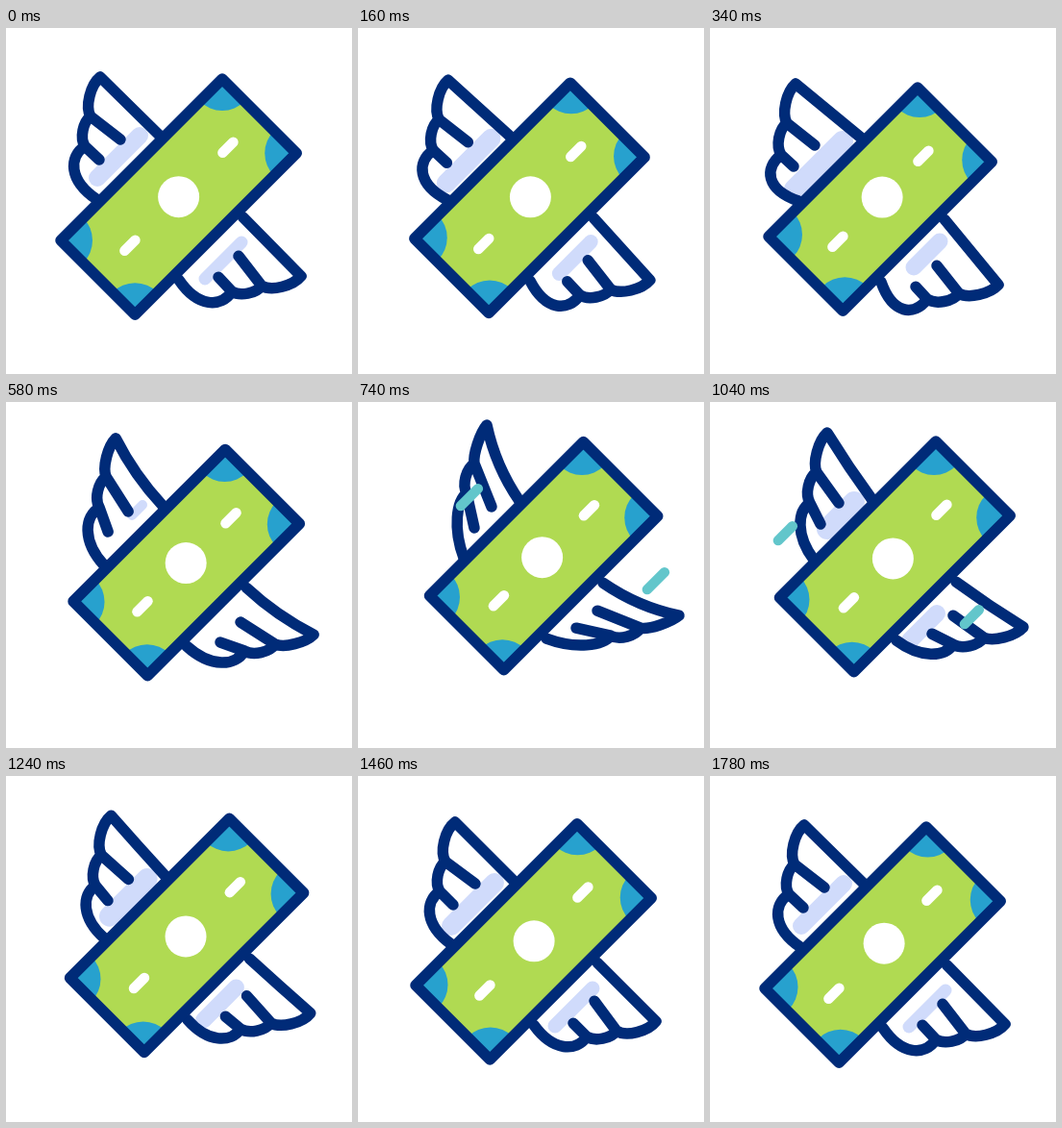
These frames come from a looping animation (360x360 px, 1800 ms). An HTML page:

```html
<!DOCTYPE html>
<html lang="en">
<head>
<meta charset="utf-8">
<title>Flying banknote</title>
<style>
  html, body { margin: 0; width: 100%; height: 100%; overflow: hidden; background: #fff; }
  svg { display: block; width: 100vw; height: 100vh; }
  .line { fill: none; stroke: #002b78; stroke-width: 11.5; stroke-linecap: round; stroke-linejoin: round; }
  .shade { stroke: #d0dbfb; stroke-linecap: round; }
  .slot { stroke: #fff; stroke-width: 10.5; stroke-linecap: round; }
  .speed { stroke: #62c6cb; stroke-width: 10.5; stroke-linecap: round; }
  .corner { fill: #27a1ce; }
</style>
</head>
<body>
<svg viewBox="0 0 360 360">
  <clipPath id="clip"><polygon class="rect"/></clipPath>
  <line class="shade"/><line class="shade"/>
  <path class="line wing"/>
  <path class="line wing" transform="matrix(0 -1 -1 0 358 356.2)"/>
  <polygon class="rect" fill="#b0da52"/>
  <g clip-path="url(#clip)">
    <circle class="corner" r="33"/><circle class="corner" r="33"/>
    <circle class="corner" r="33"/><circle class="corner" r="33"/>
  </g>
  <circle id="coin" r="21.5" fill="#fff"/>
  <line class="slot"/><line class="slot"/>
  <polygon class="rect line"/>
  <line class="speed"/><line class="speed"/>
</svg>
<script>
const LOOP = 1800;
const TIMES = [0, 340, 580, 740, 1040, 1460, 1740];
const PACE = [0, 0, 1.7, 0, 1.5, 1, 0];   // tangent strength at each key
const WIDTH = 77.25;

// The upper long edge of the bill lies on x + y = edge.
const BILL = {
  top: [225, 216, 228, 234.5, 235, 228],
  left: [57, 61, 70, 74.5, 72.5, 60],
  edge: [278, 278, 277.5, 276, 276, 277.7],
  lag: [0, 2, -.5, -1.5, -2, .5, 1.5]
};

const WING = {
  root: [159.5, 157, 163, 168, 169, 162],
  base: [94, 92, 102, 110, 108, 97],
  bend: [0, 0, .07, .1, .02, 0],
  curl: [.19, .18, .15, .1, .16, .2],
  belly: [.38, .48, .31, .17, .26, .36],
  tipX: [98, 89, 114, 134, 122, 101],
  tipY: [51, 58, 38, 24, 32, 48],
  notch1X: [88, 80, 104, 121, 111, 91],
  notch1Y: [92, 99, 78, 64, 73, 89],
  end1X: [119, 109, 127, 139, 134, 122],
  end1Y: [116, 122, 114, 109, 105, 112],
  notch2X: [82, 74, 97, 113, 104, 85],
  notch2Y: [123, 132, 110, 95, 105, 120],
  end2X: [97, 87, 106, 121, 115, 99],
  end2Y: [137, 144, 135, 131, 127, 134]
};

const SHADES = [
  { from: [95, 88, 131, 131, 122, 97], to: [139, 138, 142, 150, 150, 142],
    sum: [251, 256, 249, 250, 254, 253], width: [18, 22, 10, 0, 22, 20] },
  { from: [207, 212, 222, 222, 208, 205], to: [245, 239, 239, 239, 236, 244],
    sum: [468, 461, 459, 459, 456, 465], width: [13, 17, 0, 0, 18, 15] }
];

const all = sel => [...document.querySelectorAll(sel)];
const rects = all('.rect'), wings = all('.wing'), corners = all('.corner');
const slots = all('.slot'), shades = all('.shade'), speeds = all('.speed');
const coin = document.getElementById('coin');

const set = (el, attrs) => { for (const k in attrs) el.setAttribute(k, attrs[k]); };
const line = (el, x1, y1, x2, y2) => set(el, { x1, y1, x2, y2 });

function sample(values, t) {
  const at = i => values[i] ?? values[0];
  const last = TIMES.length - 1;
  if (t >= TIMES[last]) return at(last);
  const slope = i => (at(i + 1) - at(i)) / (TIMES[i + 1] - TIMES[i]);
  const tangent = i => {
    if (!PACE[i]) return 0;
    const a = slope(i - 1), b = slope(i);
    return a * b > 0 ? PACE[i] * 2 * a * b / (a + b) : 0;
  };
  const i = TIMES.findIndex(k => k > t) - 1;
  const span = TIMES[i + 1] - TIMES[i];
  const s = (t - TIMES[i]) / span, r = 1 - s;
  return at(i) * (1 + 2 * s) * r * r + at(i + 1) * s * s * (3 - 2 * s)
    + span * s * r * (tangent(i) * r - tangent(i + 1) * s);
}

const pose = (table, t) =>
  Object.fromEntries(Object.entries(table).map(([k, v]) => [k, sample(v, t)]));

// Bulging cubic from p to q; a is along the chord, b across it.
function arc(p, q, a1, b1, a2, b2) {
  const dx = q[0] - p[0], dy = q[1] - p[1];
  const off = (o, a, b) => [o[0] + a * dx - b * dy, o[1] + a * dy + b * dx];
  return `C${off(p, a1, b1)} ${off(q, -a2, b2)} ${q}`;
}

function wingPath(w) {
  const root = [w.root, 271 - w.root], base = [w.base, 272 - w.base];
  const tip = [w.tipX, w.tipY];
  const n1 = [w.notch1X, w.notch1Y], n2 = [w.notch2X, w.notch2Y];
  const dx = tip[0] - root[0], dy = tip[1] - root[1];
  const mid = [root[0] + dx / 2 + dy * w.bend, root[1] + dy / 2 - dx * w.bend];
  return `M${root}Q${mid} ${tip}` + arc(tip, n1, .25, w.curl, .2, w.curl) + `L${w.end1X},${w.end1Y}`
    + `M${n1}` + arc(n1, n2, .23, .21, .24, .22) + `L${w.end2X},${w.end2Y}`
    + `M${n2}` + arc(n2, base, .13, w.belly * .88, .45, w.belly * 1.12);
}

function drawBill(t) {
  const { top, left, edge, lag } = pose(BILL, t);
  const point = (u, v) => [u + v, edge - u + v];
  const pts = [point(top, 0), point(top, WIDTH), point(left, WIDTH), point(left, 0)];
  rects.forEach(r => set(r, { points: pts.join(' ') }));
  corners.forEach((c, i) => set(c, { cx: pts[i][0] + lag, cy: pts[i][1] - lag }));
  const [cx, cy] = point((top + left) / 2 + lag, WIDTH / 2);
  set(coin, { cx, cy });
  [top - 32.7, left + 33.3].forEach((u, i) => {
    line(slots[i], ...point(u - 5.5, WIDTH / 2), ...point(u + 5.5, WIDTH / 2));
  });
}

function drawShades(t) {
  SHADES.forEach((table, i) => {
    const s = pose(table, t);
    line(shades[i], s.from, s.sum - s.from, s.to, s.sum - s.to);
    set(shades[i], { 'stroke-width': Math.max(0, s.width) });
  });
}

function track(t, keys) {
  const i = Math.max(1, keys.findIndex(k => k[0] >= t));
  const [t0, a] = keys[i - 1], [t1, b] = keys[i];
  return a + (b - a) * (t - t0) / (t1 - t0);
}

function drawSpeedLines(t) {
  const visible = t > 630 && t < 1200;
  speeds.forEach(el => set(el, { visibility: visible ? 'visible' : 'hidden' }));
  if (!visible) return;
  const head = track(t, [[630, 130], [740, 107], [1040, 71], [1200, 53]]);
  const tail = track(t, [[630, 130], [740, 125], [1040, 86], [1200, 53]]);
  [[0, 0], [194, 87]].forEach(([x, y], i) =>
    line(speeds[i], head + x, 215 - head + y, tail + x, 215 - tail + y));
}

function draw(t) {
  drawShades(t);
  const d = wingPath(pose(WING, t));
  wings.forEach(w => set(w, { d }));
  drawBill(t);
  drawSpeedLines(t);
}

const start = performance.now();
function tick() {
  draw((performance.now() - start) % LOOP);
  requestAnimationFrame(tick);
}
tick();
</script>
</body>
</html>
```
